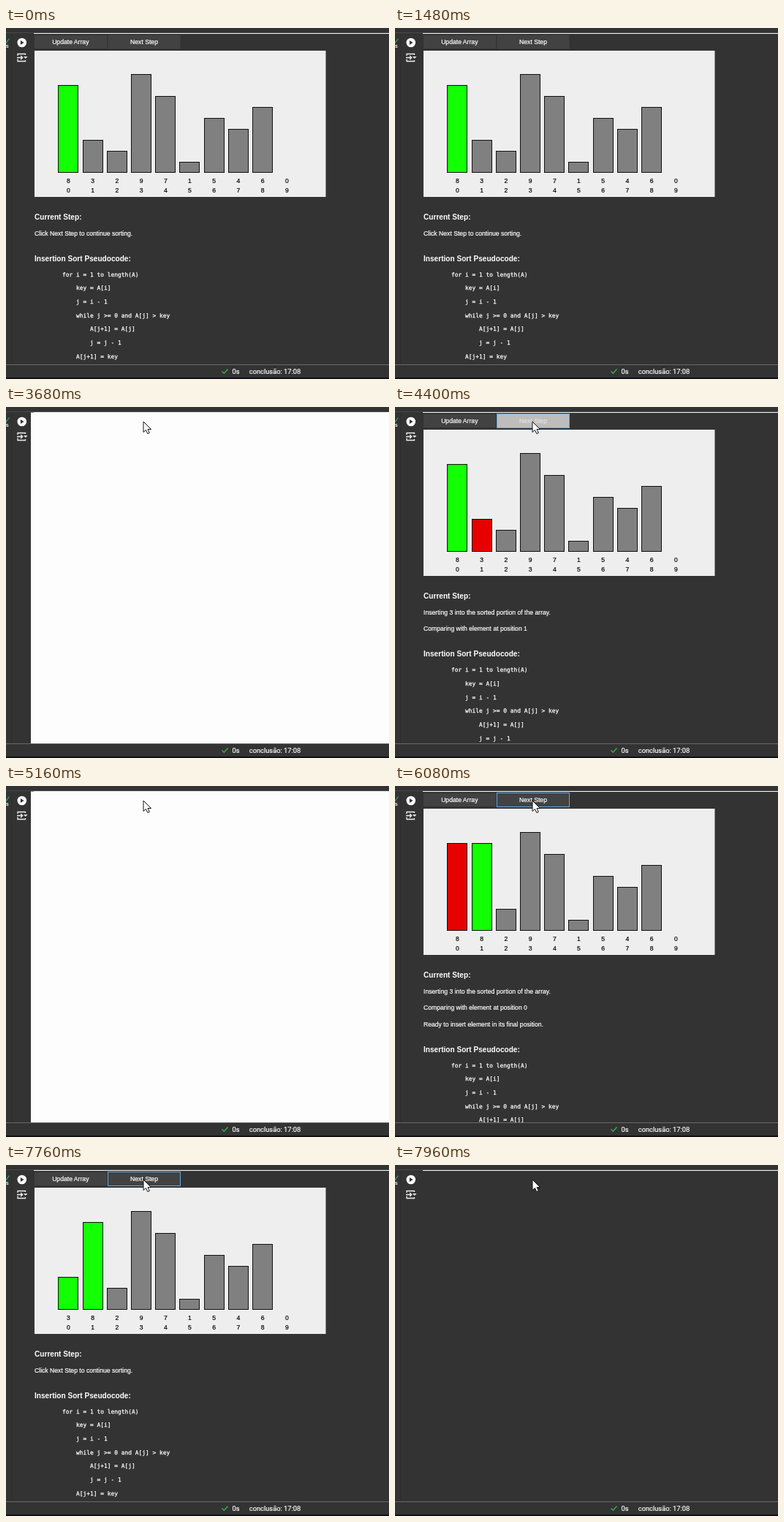
An HTML page for the animation above (8000 ms loop, 524x480 px).

```html
<!DOCTYPE html>
<html lang="en">
<head>
<meta charset="utf-8">
<title>Insertion sort stepper</title>
<style>
  html, body { margin: 0; width: 100%; height: 100%; overflow: hidden; background: #333; }
  svg { display: block; width: 100%; height: 100%; }
  text {
    font: 8.64px "Liberation Sans", Arial, sans-serif; white-space: pre;
    fill: #fff; stroke: #fff; stroke-width: .2px;
  }
  .head { font-size: 10.1px; font-weight: bold; stroke: none; }
  .code { font: 7.9px "DejaVu Sans Mono", monospace; stroke-width: .25px; }
  .tick { fill: #000; stroke: #000; text-anchor: middle; }
  .label { text-anchor: middle; }
  .status { font: 9.3px Roboto, sans-serif; }
</style>
</head>
<body>
<svg viewBox="0 0 524 480" preserveAspectRatio="none">
  <defs><clipPath id="pane"><rect width="524" height="460"/></clipPath></defs>
  <rect width="524" height="480" fill="#333"/>
  <path d="M0 6.5H524" stroke="#484848"/>
  <path d="M7.5 8V460" stroke="#2d2d2d"/>
  <path d="M38 7.5H524" stroke="#f4f4f4"/>

  <path d="M-2 18L0 20.5L4.500 14.500" fill="none" stroke="#2fa866" stroke-width="1.2"/>
  <text x="0" y="27" style="font-size:7px">s</text>
  <circle cx="21.800" cy="20" r="6.300" fill="#fff"/>
  <path d="M19.900 17L24.600 20L19.900 23Z" fill="#333"/>
  <g fill="none" stroke="#eee" stroke-width="1.300">
    <path d="M16 38V35.500H26.500V37M16 42.500V45.500H26.500V44M15 40.500H22.500M20.200 38L22.700 40.500L20.200 43"/>
  </g>
  <path d="M24 39H29.500L26.700 42Z" fill="#eee"/>

  <g id="content" clip-path="url(#pane)">
    <rect x="39" y="10" width="99" height="18" fill="#424242"/>
    <text class="label" x="88.300" y="22.300">Update Array</text>
    <rect id="next" x="139.500" y="9.500" width="99" height="19"/>
    <text id="nextLabel" class="label" x="189" y="22.300">Next Step</text>
    <rect x="39" y="31" width="398.500" height="200" fill="#eee"/>
    <g id="steps"></g>
  </g>
  <rect id="blank" x="34" y="7.500" width="490" height="452.500" fill="#fdfdfd"/>

  <path d="M0 460.500H524" stroke="#6a6a6a"/>
  <path d="M0 479H524" stroke="#101014" stroke-width="2"/>
  <path d="M295.500 469.500L298.300 472.300L303.500 466.500" fill="none" stroke="#35b04a" stroke-width="1.400"/>
  <text class="status" x="309.500" y="472.700">0s</text>
  <text class="status" x="332.800" y="472.700">conclusão: 17:08</text>

  <g id="cursor" fill="#fff" stroke="#111" stroke-linejoin="round">
    <path id="arrow" d="M0 0V14.500L3.400 11.400L5.800 16.500L8.300 15.400L6 10.500H10.500Z"/>
    <path id="hand" d="M3.500 1.500Q5 -.5 6.500 1.500V7Q8.500 6 9.500 8Q11.500 7 12.500 9Q15 8.500 15 11V14.500L13 20H5.500L.5 13Q-1 10 1.500 10.500L3.500 12.500Z"/>
  </g>
</svg>
<script>
const LOOP = 8000;
const GRAY = '#808080', GREEN = '#12ff04', RED = '#e60000';
const $ = id => document.getElementById(id);

const PSEUDOCODE = [
  'for i = 1 to length(A)',
  '    key = A[i]',
  '    j = i - 1',
  '    while j >= 0 and A[j] > key',
  '        A[j+1] = A[j]',
  '        j = j - 1',
  '    A[j+1] = key'
];
const REST = [2, 9, 7, 1, 5, 4, 6, 0];
const IDLE = ['Click Next Step to continue sorting.'];
const INSERTING = 'Inserting 3 into the sorted portion of the array.';
const COMPARING = 'Comparing with element at position ';
const STEPS = [
  { head: [8, 3], colors: [GREEN], lines: IDLE },
  { head: [8, 3], colors: [GREEN, RED], lines: [INSERTING, COMPARING + '1'] },
  { head: [8, 8], colors: [RED, GREEN],
    lines: [INSERTING, COMPARING + '0', 'Ready to insert element in its final position.'] },
  { head: [3, 8], colors: [GREEN, GREEN], lines: IDLE }
];

// Each click: press, release, output cleared, white pane, next step drawn.
const CLICKS = [
  [2780, 2920, 3520, 3600, 3960],
  [4400, 4500, 5080, 5120, 5480],
  [5900, 6000, 6400, 6440, 6720],
  [7400, 7500, 7920, 8000, 8000]
];
const CURSOR = [[2200, 225, 482], [2700, 189, 20], [3400, 189, 20], [3500, 188, 20]];

function add(parent, tag, attrs, text) {
  const el = document.createElementNS('http://www.w3.org/2000/svg', tag);
  for (const name in attrs) el.setAttribute(name, attrs[name]);
  if (text !== undefined) el.textContent = text;
  return parent.appendChild(el);
}

// Centre a one-pixel outline on the pixel grid.
const snap = v => Math.floor(v) + .5;

function buildStep({ head, colors, lines }) {
  const group = add($('steps'), 'g', {});
  [...head, ...REST].forEach((value, i) => {
    const x = 71.9 + 33.2 * i, top = snap(198 - value * 14.9);
    if (value) add(group, 'rect', {
      x: snap(x), y: top, width: 27, height: 197.5 - top, fill: colors[i] || GRAY, stroke: '#111'
    });
    add(group, 'text', { class: 'tick', x: x + 13.6, y: 211.7 }, value);
    add(group, 'text', { class: 'tick', x: x + 13.6, y: 225.2 }, i);
  });
  add(group, 'text', { class: 'head', x: 39, y: 261.5 }, 'Current Step:');
  lines.forEach((line, i) => add(group, 'text', { x: 39, y: 283.8 + 22.6 * i }, line));
  const shift = 22.6 * (lines.length - 1);
  add(group, 'text', { class: 'head', x: 39, y: 318.5 + shift }, 'Insertion Sort Pseudocode:');
  PSEUDOCODE.forEach((line, i) => {
    const code = line.trimStart(), indent = line.length - code.length;
    add(group, 'text', { class: 'code', x: 77 + 4.75 * indent, y: 339.6 + 18.67 * i + shift }, code);
  });
  return group;
}
const groups = STEPS.map(buildStep);

function show(el, on) { el.style.display = on ? '' : 'none'; }

function cursorAt(t) {
  const k = CURSOR.findIndex(point => point[0] > t);
  if (k < 0) return CURSOR[CURSOR.length - 1].slice(1);
  if (k === 0) return CURSOR[0].slice(1);
  const [t0, x0, y0] = CURSOR[k - 1], [t1, x1, y1] = CURSOR[k];
  const p = 1 - (1 - (t - t0) / (t1 - t0)) ** 3;
  return [x0 + (x1 - x0) * p, y0 + (y1 - y0) * p];
}

function render(t) {
  const within = (from, to) => t >= from && t < to;
  const step = CLICKS.filter(click => t >= click[4]).length;
  const any = (a, b) => CLICKS.some(click => within(click[a], click[b]));
  const pressed = any(0, 1), focused = any(0, 2);

  show($('content'), !any(2, 4));
  show($('blank'), any(3, 4));
  groups.forEach((group, i) => show(group, i === step));
  $('next').setAttribute('fill', pressed ? '#bdbdbd' : '#424242');
  $('next').setAttribute('stroke', focused ? '#64a9e0' : 'none');
  $('nextLabel').style.fill = $('nextLabel').style.stroke = pressed ? '#e2e2e2' : '#fff';

  const [x, y] = cursorAt(t), hand = within(2660, 3500);
  show($('cursor'), t >= CURSOR[0][0]);
  show($('hand'), hand);
  show($('arrow'), !hand);
  $('cursor').setAttribute('transform', `translate(${x} ${y})`);
}

const start = performance.now();
function tick() {
  render((performance.now() - start) % LOOP);
  requestAnimationFrame(tick);
}
tick();
</script>
</body>
</html>
```
